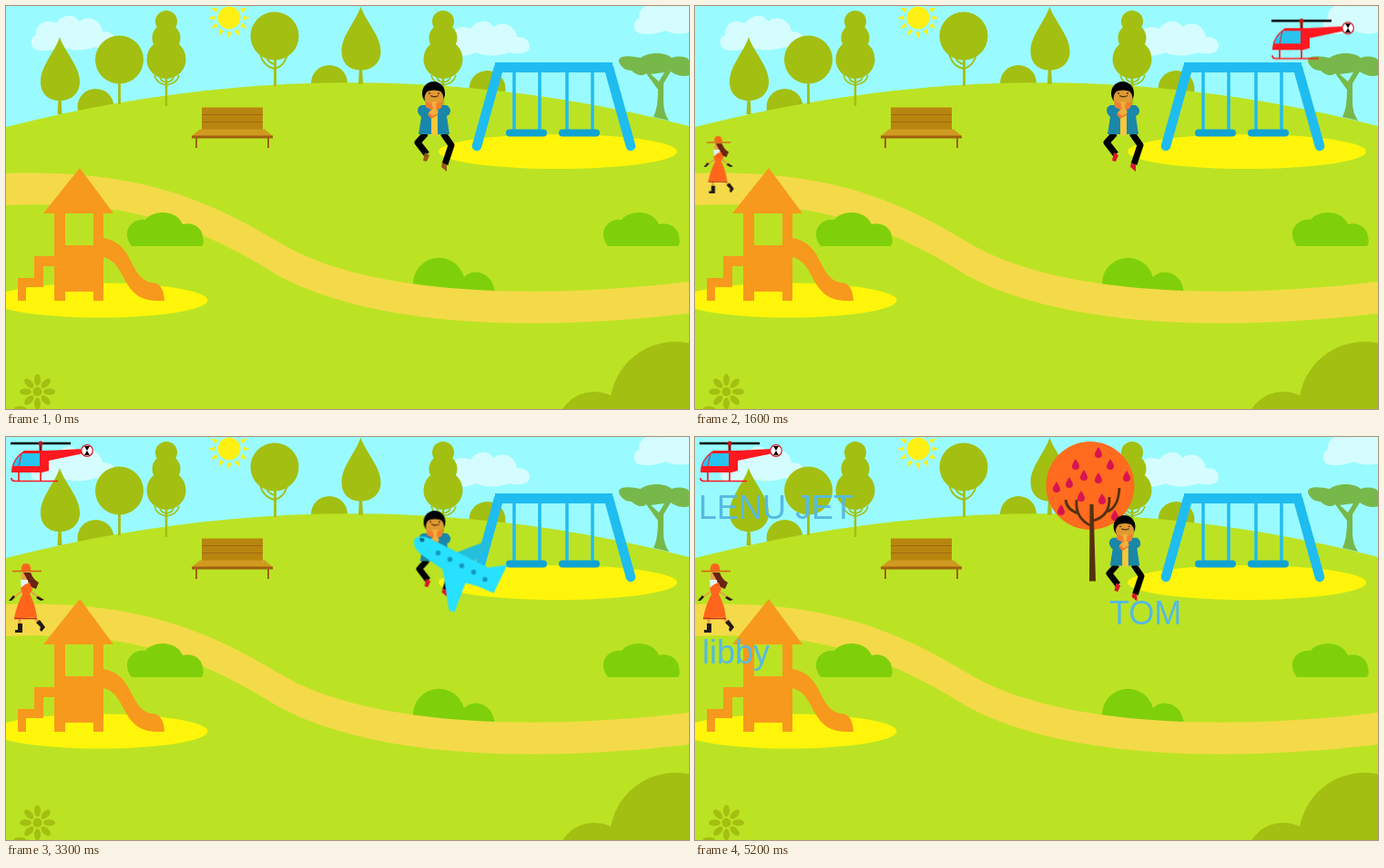
An HTML page without scripts that plays this animation: 750x443 px, repeating every 5400 ms.

```html
<!DOCTYPE html>
<html lang="en">
<head>
<meta charset="utf-8">
<title>Playground</title>
<style>
html, body { margin: 0; width: 100%; height: 100%; overflow: hidden; background: #bbe324; }
svg { display: block; width: 100vw; height: 100vh; }
text { font: 36px "Liberation Sans", Arial, sans-serif; fill: #55b9e2; }

/* A loop is 54 ticks of 100 ms; the small lead keeps each tick clear of rounding. */
.actor { animation: 5400ms -5ms infinite step-end; }
#walker { animation-name: walk; transform-origin: 24px 215px; }
#heli { animation-name: hover; }
#plane { animation-name: fly; }
#sitter { animation-name: sit; transform-origin: 447px 83px; }
#shoes { animation-name: shoes; }
#redTree { animation-name: grow; }
#names { animation-name: label; }

@keyframes walk {
  0% { transform: translate(748px, 110px) scale(.83); animation-timing-function: steps(5); }
  9.259% { transform: translate(488px, 119px) scale(.83); animation-timing-function: steps(2); }
  12.963% { transform: translate(384px, 103px) scale(.83); animation-timing-function: steps(3); }
  18.519% { transform: translate(228px, 38px) scale(.83); animation-timing-function: steps(4); }
  25.926% { transform: translate(3px, -9px) scale(.83); }
  46.296%, 100% { transform: none; }
}
@keyframes hover {
  0% { transform: translate(748px, 11px); }
  25.926% { transform: translate(748px, 11px); animation-timing-function: steps(7); }
  38.889% { transform: translate(328px, 5px); animation-timing-function: steps(5); }
  48.148%, 100% { transform: none; }
}
@keyframes fly {
  0% { transform: translate(180px, 280px); }
  44.444% { transform: translate(180px, 280px); animation-timing-function: steps(4); }
  51.852% { transform: none; animation-timing-function: steps(11); }
  72.222% { transform: translate(-285px, -144px); animation-timing-function: steps(6); }
  83.333% { transform: translate(-357px, -234px); animation-timing-function: steps(2); }
  87.037%, 100% { transform: translate(-381px, -280px); }
}
@keyframes sit {
  0% { transform: none; }
  48.148% { transform: translate(-1px, -5px) scale(.955); }
  59.259% { transform: translate(2px, -2px) scale(.955); }
  90.741%, 100% { transform: translate(3px, 3px) scale(.955); }
}
@keyframes shoes { 0% { fill: #9b5a1c; } 25.926%, 100% { fill: #d8182a; } }
@keyframes grow { 0% { visibility: hidden; } 88.889%, 100% { visibility: visible; } }
@keyframes label { 0% { visibility: hidden; } 94.444%, 100% { visibility: visible; } }
</style>
</head>
<body>
<svg viewBox="0 0 750 443" preserveAspectRatio="none">
  <defs>
    <path id="cloud" d="M33 48C26 46 26 34 33 32C32 18 45 14 55 19C62 9 75 8 80 17C92 9 104 16 106 28C116 28 120 32 120 39C119 46 108 48 98 45C88 49 70 50 62 45C52 49 42 50 33 48Z"/>
    <g id="dropTree">
      <path d="M59 34C64 50 81 66 81 83C81 97 71 104 59 104S38 97 38 83C38 66 54 50 59 34Z"/>
      <path d="M57.500 100h3l1 19h-5z"/>
    </g>
    <g id="tripleTree">
      <circle cx="176" cy="17" r="12"/>
      <circle cx="176" cy="35" r="15.500"/>
      <circle cx="176" cy="58.500" r="21.500"/>
      <path d="M176 75V110" stroke-width="2.500"/>
      <path d="M163 76Q165 85 176 87Q188 85 190 76M169 78Q170 83 176 84Q183 83 184 78" fill="none" stroke-width="1.500"/>
    </g>
    <path id="bush" d="M138 264C126 249 137 233 153 235C160 225 186 222 194 240C206 237 216 245 216 254Q218 260 215 264Z"/>
    <path id="ray" d="M-2.600 -15.500H2.600L0 -23Z"/>
    <g id="rays">
      <use href="#ray"/><use href="#ray" transform="rotate(30)"/><use href="#ray" transform="rotate(60)"/>
    </g>
    <g id="petals">
      <ellipse cy="-13" rx="3.500" ry="6.500"/>
      <ellipse cy="-13" rx="3.500" ry="6.500" transform="rotate(45)"/>
    </g>
    <path id="drop" d="M0 -6Q4 0 4 2A4 4 0 0 1 -4 2Q-4 0 0 -6Z"/>
    <path id="seat" d="M553 139.500H590" stroke-width="8"/>
  </defs>

  <!-- sky -->
  <path fill="#99fbff" d="M0 0H750V150H0Z"/>
  <g fill="#d5fdff">
    <use href="#cloud"/><use href="#cloud" x="455" y="6"/><use href="#cloud" x="662" y="-18"/>
  </g>
  <g fill="#fff013" transform="translate(245 13)">
    <circle r="12.500"/>
    <use href="#rays"/><use href="#rays" transform="rotate(90)"/>
    <use href="#rays" transform="rotate(180)"/><use href="#rays" transform="rotate(270)"/>
  </g>

  <!-- hill and trees -->
  <g fill="#a3bf11">
    <circle cx="98.500" cy="111" r="20"/><circle cx="355" cy="85" r="20"/><circle cx="528.500" cy="91" r="20"/>
  </g>
  <path fill="#bbe324" d="M0 133Q380 36 750 132V443H0Z"/>
  <g fill="#a3bf11" stroke="#a3bf11" stroke-width="0">
    <use href="#dropTree"/><use href="#dropTree" x="330.500" y="-33.500"/>
    <use href="#tripleTree"/><use href="#tripleTree" x="304"/>
    <circle cx="124.500" cy="59" r="26.500"/>
    <circle cx="295" cy="33" r="26.500"/>
    <path d="M124.500 80V108M295.500 55V88" stroke-width="2.800"/>
    <path d="M279 52Q282 66 295 69Q306 66 309 53M286 55Q287 62 295 64" fill="none" stroke-width="1.800"/>
  </g>
  <path fill="#78b84a" d="M673 61C672 53 688 55 697 57C705 51 723 50 731 57C740 54 751 56 751 62V76C740 79 733 74 730 72L722 85L722 106Q722 117 728 126L711 122Q716 112 716 92L703 74C697 79 690 74 687 71C680 71 675 67 673 61ZM708 75L717 83L723 73Z" fill-rule="evenodd"/>

  <!-- bench -->
  <path fill="#b8860f" d="M215 111.500H282V136H215Z"/>
  <path stroke="#9a6a10" d="M215 119.500H282M215 127.500H282"/>
  <path fill="#d09a20" d="M213 135.500H284L293 143H204Z"/>
  <path fill="#a0600f" d="M204 142.500H293V145.500H204ZM208 145H210V156H208ZM287 145H289V156H287Z"/>

  <!-- swings -->
  <ellipse cx="606" cy="160" rx="131" ry="19" fill="#fff50a"/>
  <g fill="none" stroke="#1fbcf0" stroke-linecap="round">
    <path d="M558 70V137M586 70V137M616 70V137M644 70V137" stroke-width="3.500"/>
    <path d="M541 68L517 154M662 68L686 154" stroke-width="10.500"/>
    <path d="M537 62H666V73H537Z" fill="#1fbcf0" stroke="none"/>
    <g stroke="#10a3d2"><use href="#seat"/><use href="#seat" x="58"/></g>
  </g>

  <!-- path and bushes -->
  <g fill="#7fd00b">
    <path d="M447 316V304A28.500 28.500 0 0 1 503 298Q510 291 520 293Q535 297 537 316Z"/>
  </g>
  <path fill="#f4da48" d="M0 184C130 180 210 205 300 260C400 320 590 322 750 303V338C590 357 410 355 300 297C200 235 130 214 0 219Z"/>
  <g fill="#7fd00b"><use href="#bush"/><use href="#bush" x="523"/></g>

  <!-- slide -->
  <ellipse cx="103" cy="323.500" rx="118.500" ry="19" fill="#fff50a"/>
  <g fill="#f7991c">
    <path d="M41 228L81 178L118 228H107V324H96V314H65V324H53V286H41V309H22V324H13V299H31V275H53V228ZM65 228V263H96V228Z" fill-rule="evenodd"/>
    <path d="M106 255C142 260 134 299 160 304Q173 304 174 324H163C125 321 133 281 106 276Z"/>
  </g>

  <!-- foreground plants -->
  <g fill="#a3bf11">
    <circle cx="735" cy="441" r="72"/><circle cx="646" cy="465" r="41"/>
    <g transform="translate(34.500 424)">
      <circle r="5"/>
      <use href="#petals"/><use href="#petals" transform="rotate(90)"/>
      <use href="#petals" transform="rotate(180)"/><use href="#petals" transform="rotate(270)"/>
      <path d="M-1 15H1V20H-1ZM-25 17Q-14 14 -11 20H-26Z"/>
    </g>
  </g>

  <g id="redTree" class="actor">
    <circle cx="434" cy="53.500" r="48.500" fill="#ff6b1f"/>
    <path d="M433.500 74H437.500L440 158.500H433Z" fill="#54310f"/>
    <path d="M436 98Q417 90 419 69M437 92Q456 87 455 66M453 82Q465 77 466 56M421 84Q408 80 407 69" fill="none" stroke="#54310f" stroke-width="2.800"/>
    <g fill="#d81450">
      <use href="#drop" x="443" y="17"/><use href="#drop" x="418" y="30"/><use href="#drop" x="456" y="30"/>
      <use href="#drop" x="427" y="42"/><use href="#drop" x="443" y="45"/><use href="#drop" x="411" y="50"/>
      <use href="#drop" x="397" y="55"/><use href="#drop" x="474" y="43"/><use href="#drop" x="424" y="65"/>
      <use href="#drop" x="447" y="68"/><use href="#drop" x="402" y="80"/><use href="#drop" x="461" y="86"/>
    </g>
  </g>

  <g id="sitter" class="actor">
    <path d="M461 140L452 150L462 163M480 140L489 153L482 174" fill="none" stroke="#000" stroke-width="7" stroke-linejoin="round"/>
    <g id="shoes" class="actor">
      <path d="M460 161L465 164L462 171L458 170ZM479 172L484 175V182L478 177Z"/>
    </g>
    <path d="M456 109H484Q490 113 487 119L484 121L487 141H453L456 122Q450 117 453 111Z" fill="#1a87a8"/>
    <path d="M467 109H474V142H467Z" fill="#f6c83c"/>
    <ellipse cx="469.500" cy="96" rx="12.500" ry="13" fill="#000"/>
    <ellipse cx="470" cy="101" rx="10.500" ry="10" fill="#e09a32"/>
    <path d="M459 95Q463 87 469 89Q477 87 481 95Q470 90 459 95Z"/>
    <path d="M464 96h2M474 96h2M466 98.500Q470 101 475 98.500" stroke="#5a3410" fill="none" stroke-width="1.300"/>
    <path d="M460 104L466 107H474L480 104L478 112L472 115L474 120L467 124L463 119L467 114L461 111Z" fill="#f27e2e"/>
    <path d="M467 105H473L472 112L475 117L469 121L464 117L469 113Z" fill="#f3ae3c"/>
  </g>

  <g id="walker" class="actor">
    <path d="M17 170L6 178M27 170L39 178" stroke="#e8a040" stroke-width="2"/>
    <path d="M3 180L8 174L10 176L6 180ZM35 175L42 179L38 180L33 177Z" fill="#2a1a10"/>
    <path d="M15 198V206M31 198L36 204" stroke="#e8a040" stroke-width="3"/>
    <path d="M13 205H18V215H10V212H13ZM33 204L37 201L43 209L39 214L37 212L38 209Z" fill="#241a14"/>
    <ellipse cx="21" cy="153" rx="4.500" ry="5.500" fill="#eba64a"/>
    <path d="M19 149H27Q30 157 36 160L33 167Q25 165 24 158Z" fill="#6b2412"/>
    <path d="M16 157H24L25 168H17Z" fill="#e3f4ee"/>
    <path d="M21 162L26 160L29 168L26 172Q32 184 34 198L9 199Q12 184 18 173L16 166Z" fill="#ff661c"/>
    <path d="M9 199.500H34" stroke="#c52a12" stroke-width="1.500"/>
    <path d="M17 147Q16 139 22 139T27 147Z" fill="#ff661c"/>
    <path d="M7 147.500H39" stroke="#d9641a" stroke-width="1.600"/>
  </g>

  <g id="heli" class="actor">
    <path d="M5 7H71" stroke="#000" stroke-width="2.500"/>
    <path d="M38 7V15" stroke="#8a1010" stroke-width="3"/>
    <circle cx="38" cy="7" r="2.500" fill="#c01818"/>
    <path d="M20 15H45L85 13V18L47 26V37L40 39H6Q6 24 20 15Z" fill="#ff1820"/>
    <path d="M18 18H37V32H8Q10 24 18 18Z" fill="#27c4f0"/>
    <path d="M17 18L14 32" stroke="#ff1820"/>
    <path d="M14 39V48M38 39V48M6 45Q6 48.500 10 48.500H57" stroke="#ff1820" stroke-width="1.700" fill="none"/>
    <circle cx="89" cy="15" r="6.300" fill="#fff" stroke="#d01820" stroke-width="1.200"/>
    <path d="M86 10H92L89 15L92 20H86L89 15Z" fill="#000"/>
  </g>

  <g id="plane" class="actor">
    <path d="M620 194L659 179L662 184L641 205Z" fill="#25bedb"/>
    <path d="M578 178Q583 172 595 177L659 209L680 206L665 237L646 229L634 226L622 258L616 256L609 211L586 195Q575 186 578 178Z" fill="#27e1ff"/>
    <path d="M584 176L589 177L588 181L584 180Z" fill="#14677e"/>
    <g fill="#1597bb">
      <circle cx="604" cy="193" r="2.700"/><circle cx="617" cy="200" r="2.700"/><circle cx="630" cy="207" r="2.700"/>
      <circle cx="643" cy="214" r="2.700"/><circle cx="655.500" cy="222" r="2.700"/>
    </g>
  </g>

  <g id="names" class="actor">
    <text x="4" y="90">LENU JET</text>
    <text x="8" y="249">libby</text>
    <text x="455" y="206">TOM</text>
  </g>
</svg>
</body>
</html>
```
